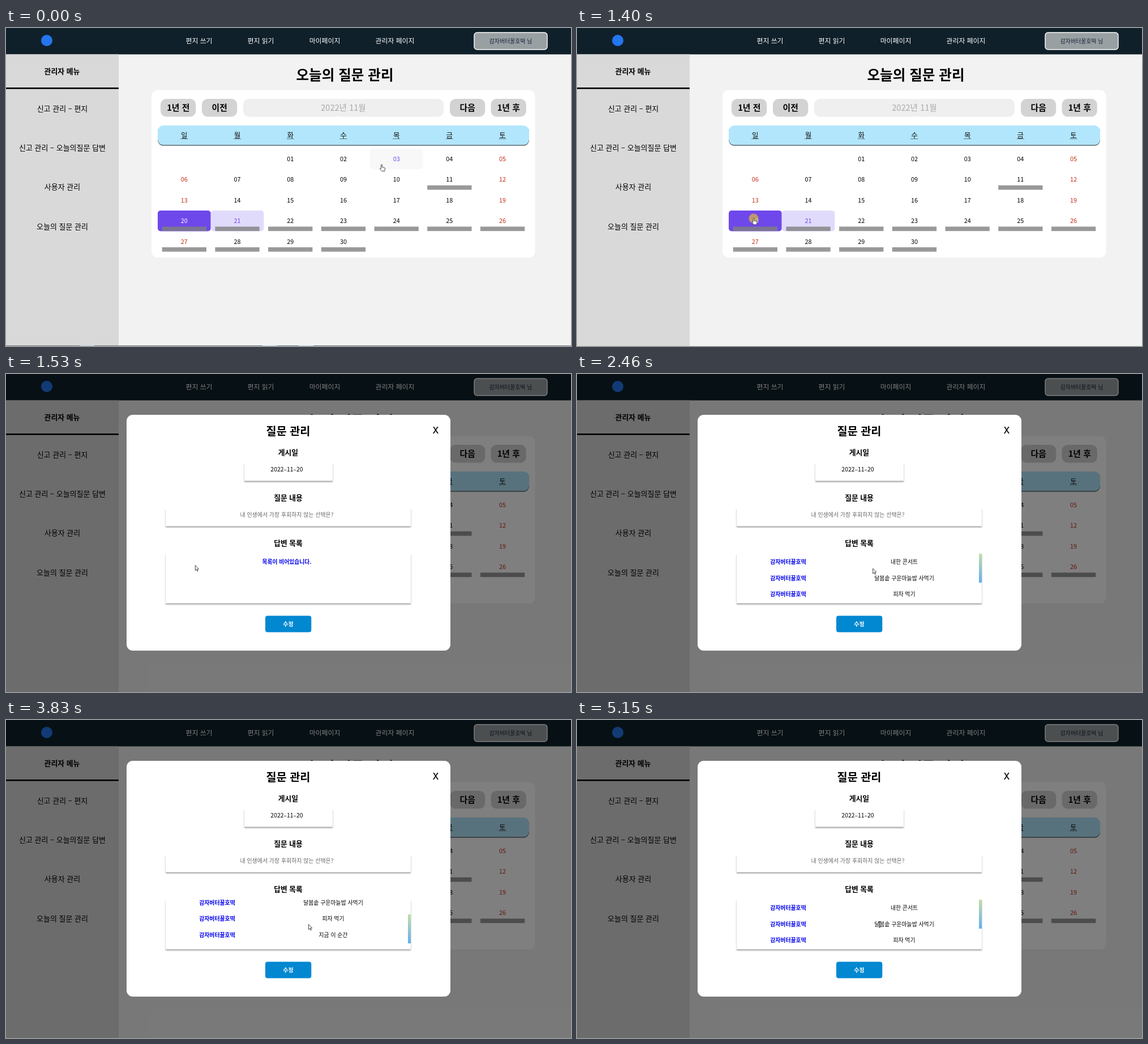
These frames come from a looping animation (998 px wide and 561 px high, 6.09 s). An HTML page:

```html
<!DOCTYPE html>
<html lang="ko">
<head>
<meta charset="utf-8">
<title>오늘의 질문 관리</title>
<style>
  html, body { margin: 0; width: 100%; height: 100%; overflow: hidden; background: #f2f2f2; }
  svg { display: block; width: 100vw; height: 100vh; font-family: "Noto Sans CJK KR", "Noto Sans CJK", "Noto Sans", sans-serif; }
  .field { fill: #fff; filter: drop-shadow(0 2.2px 1px rgba(0, 0, 0, .38)); }
  .cursor { stroke: #333; stroke-width: .9; stroke-linejoin: round; fill: #fff; }
  .close { font-family: Inter, sans-serif; }
</style>
</head>
<body>
<svg id="stage" viewBox="0 0 998 561"></svg>
<script>
const LOOP = 6090, ROW = 28.6, SCROLL = 38;
const USER = '감자버터꿀호떡';
const ANSWERS = ['내한 콘서트', '달봄솥 구운마늘밥 사먹기', '피자 먹기', '지금 이 순간'];
const COL = 93.7, LINE = 36.4, GRID_X = 268, GRID_Y = 212.8;
const PURPLE = '#6f48eb';

// Text is placed by its visual centre.
const text = (s, x, y, size, color = '#000', weight = 400, extra = '') =>
  `<text x="${x}" y="${y + size * .37}" text-anchor="middle" font-size="${size}" font-weight="${weight}" fill="${color}" ${extra}>${s}</text>`;
const rect = (x, y, w, h, fill, r = 0, extra = '') =>
  `<rect x="${x}" y="${y}" width="${w}" height="${h}" rx="${r}" fill="${fill}" ${extra}/>`;
const field = (x, y, w, h) => rect(x, y, w, h, '#fff', 0, 'class="field"');

function header() {
  const nav = [['편지 쓰기', 341], ['편지 읽기', 450], ['마이페이지', 563], ['관리자 페이지', 687]];
  return rect(0, 0, 998, 46.5, '#0f202a') + '<circle cx="72" cy="22" r="10" fill="#2476ee"/>' +
    nav.map(([s, x]) => text(s, x, 23, 11.9, '#fff', 500)).join('') +
    rect(827, 8, 129, 30, '#99a0a2', 5, 'stroke="#fff" stroke-width="1.4"') +
    text(USER + ' 님', 891.5, 23, 9.9, '#14213a', 500);
}

function sidebar() {
  const items = ['신고 관리 – 편지', '신고 관리 – 오늘의질문 답변', '사용자 관리', '오늘의 질문 관리'];
  return rect(0, 46.5, 199, 514.5, '#d9d9d9') + rect(0, 105, 199, 2.6, '#000') +
    text('관리자 메뉴', 99, 76, 12.9, '#000', 700) +
    items.map((s, i) => text(s, 99.5, 142 + 69.3 * i, 13)).join('');
}

function day(d) {
  const col = (d + 1) % 7, row = Math.floor((d + 1) / 7);
  const x = GRID_X + col * COL, y = GRID_Y + row * LINE;
  const fill = { 20: PURPLE, 21: '#e1dbfb' }[d] || 'none';
  const color = { 20: '#fff', 21: PURPLE }[d] || (col % 6 ? '#000' : '#c22c14');
  const marked = d === 11 || d >= 20;
  return rect(x, y, COL, LINE, fill, 5, `id="cell${d}"`) +
    text(String(d).padStart(2, '0'), x + COL / 2, y + 18.2, 10.8, color, 400, `id="day${d}"`) +
    (marked ? rect(x + 7.7, y + 28.4, 78.3, 7.8, 'rgba(128,128,128,.8)') : '');
}

function calendar() {
  const buttons = [['1년 전', 273], ['이전', 346], ['다음', 784], ['1년 후', 856.5]];
  const weekdays = [...'일월화수목금토'].map((s, i) => {
    const x = GRID_X + COL * (i + .5);
    return text(s, x, 189, 12.5, '#111', 500) +
      `<path d="M${x - 6} 195.5h12" stroke="#111" stroke-width="1.2" stroke-dasharray="1.4 1.3"/>`;
  }).join('');
  return text('오늘의 질문 관리', 598.5, 83, 24.6, '#000', 700) +
    rect(257, 109.5, 677.5, 295.5, '#fff', 11) +
    buttons.map(([s, x]) => rect(x, 125, 62.3, 31.5, '#d3d3d3', 10) + text(s, x + 31.2, 141, 14.8, '#000', 700)).join('') +
    rect(419, 125, 354, 31.5, '#efefef', 10) + text('2022년 11월', 596, 141, 14.6, '#aaa', 300) +
    rect(268, 173, 656, 34.6, '#222', 10) + rect(268, 172, 656, 34.6, '#b2e6fc', 10) + weekdays +
    Array.from({ length: 30 }, (_, i) => day(i + 1)).join('');
}

function modal() {
  const rows = ANSWERS.map((s, i) => {
    const y = 331.5 + ROW * i;
    return text(USER, 373, y, 9.9, '#0000ee', 700) + text(s, 578, y, 9.9);
  }).join('');
  return rect(0, 0, 998, 561, '#000', 0, 'id="shade"') +
    rect(213, 72, 572, 416, '#fff', 11) +
    text('질문 관리', 498.5, 101, 19.7, '#000', 700) + text('X', 759, 99.5, 15.5, '#000', 500, 'class="close"') +
    text('게시일', 498.5, 138, 12.8, '#000', 700) + field(421, 157, 156, 31.5) +
    text('2022–11–20', 496, 168, 10.4) +
    text('질문 내용', 498.5, 218, 12.8, '#000', 700) + field(282, 237, 433, 31.5) +
    text('내 인생에서 가장 후회하지 않는 선택은?', 496, 248, 9.95, '#666') +
    text('답변 목록', 498.5, 298, 12.8, '#000', 700) + field(282, 317, 433, 87.5) +
    text('목록이 비어있습니다.', 496, 331.5, 9.8, '#0000ee', 700, 'id="empty"') +
    `<g id="answers" clip-path="url(#listClip)"><g id="rows">${rows}</g>${rect(710, 317, 5, 51, 'url(#thumbFill)', 0, 'id="thumb"')}</g>` +
    rect(458, 426.5, 81.3, 29, '#0288d1', 4) + text('수정', 498.5, 441, 10, '#fff', 700);
}

const taskbar = rect(0, 560, 998, 1, '#70767a') + [130, 453, 517].map(x => rect(x, 560, 26, 1, '#a8d4ea')).join('');

document.getElementById('stage').innerHTML = `
  <defs>
    <clipPath id="listClip"><rect x="282" y="317" width="433" height="87.5"/></clipPath>
    <linearGradient id="thumbFill" x2="0" y2="1"><stop stop-color="#c3dfa2"/><stop offset="1" stop-color="#62aff5"/></linearGradient>
  </defs>
  ${rect(0, 0, 998, 561, '#f2f2f2')}${header()}${sidebar()}${calendar()}
  <g id="taskbar">${taskbar}</g>
  <g id="modal">${modal()}</g>
  <circle id="click" cx="312" cy="336" r="8.5" fill="#e6c530" opacity=".65"/>
  <g id="pointer">
    <path id="hand" class="cursor" d="M-1 1.2a1 1 0 0 1 2 0V5l3.8.8q1.4.4 1.2 1.8L5.3 12H.6L-3.2 8q.2-1.6 2.2-.4Z"/>
    <path id="arrow" class="cursor" d="M0 0V9L2.1 7.1 3.6 10.4 4.9 9.8 3.5 6.6H6.2Z"/>
    <path id="beam" d="M-1.5-5H1.5M0-5V5M-1.5 5H1.5" stroke="#222" fill="none"/>
  </g>`;

const el = id => document.getElementById(id);
const show = (id, on) => el(id).setAttribute('display', on ? 'inline' : 'none');
const mix = (a, b, p) => a + (b - a) * p;
const smooth = p => p * p * (3 - 2 * p);

// Progress 0..1 of a move made of `count` held steps, the first at `start`, the last at `end`.
function steps(t, start, end, count) {
  if (t < start) return 0;
  return Math.min(1, (Math.floor((t - start) * (count - 1) / (end - start) + 1e-6) + 1) / count);
}

const moves = [
  { start: 70, end: 660, count: 10, to: [402, 293] },
  { start: 730, end: 1190, count: 8, to: [312, 335] },
  { start: 1460, end: 1461, count: 1, to: [311.5, 336] },
  { start: 1530, end: 1600, count: 2, to: [357, 339], linear: true },
  { start: 1660, end: 1800, count: 3, to: [491, 322], linear: true },
  { start: 2060, end: 2590, count: 8, to: [528.5, 347] },
  { start: 3630, end: 3830, count: 4, to: [534.5, 360.5] },
];

function pointerAt(t) {
  let pos = [663.5, 240.5];
  for (const m of moves) {
    if (t < m.start) break;
    const p = steps(t, m.start, m.end, m.count), e = m.linear ? p : smooth(p);
    pos = pos.map((v, i) => mix(v, m.to[i], e));
  }
  return pos;
}

let hovered = 0;
function hover(d) {
  if (d === hovered) return;
  const paint = (n, on) => {
    if (n < 1 || n > 19) return;
    el('cell' + n).style.fill = on ? '#f8f8f8' : '';
    el('day' + n).style.fill = on ? PURPLE : '';
  };
  paint(hovered, false);
  paint(d, true);
  hovered = d;
}

function render(t) {
  const [x, y] = pointerAt(t), open = t >= 1460, loaded = t >= 1600;
  show('taskbar', t < 70);
  show('click', t >= 1400 && !open);
  show('modal', open);
  el('shade').setAttribute('fill-opacity', t < 1530 ? .75 : .5);
  hover(open ? 0 : Math.floor((x - GRID_X) / COL) + 7 * Math.floor((y - GRID_Y) / LINE) - 1);

  show('empty', !loaded);
  show('answers', loaded);
  const down = smooth(steps(t, 2860, 3170, 5)), up = steps(t, 4420, 4560, 3) ** 1.4;
  const scroll = SCROLL * (down - up);
  el('rows').setAttribute('transform', `translate(0 ${-scroll})`);
  el('thumb').setAttribute('y', 317 + scroll * 26 / SCROLL);

  const beam = (t >= 2590 && t < 2860) || t >= 5150;
  show('hand', !open);
  show('arrow', open && !beam);
  show('beam', beam);
  el('pointer').setAttribute('transform', `translate(${x} ${y})`);
}

const began = performance.now();
function frame() {
  render((performance.now() - began) % LOOP);
  requestAnimationFrame(frame);
}
frame();
</script>
</body>
</html>
```
